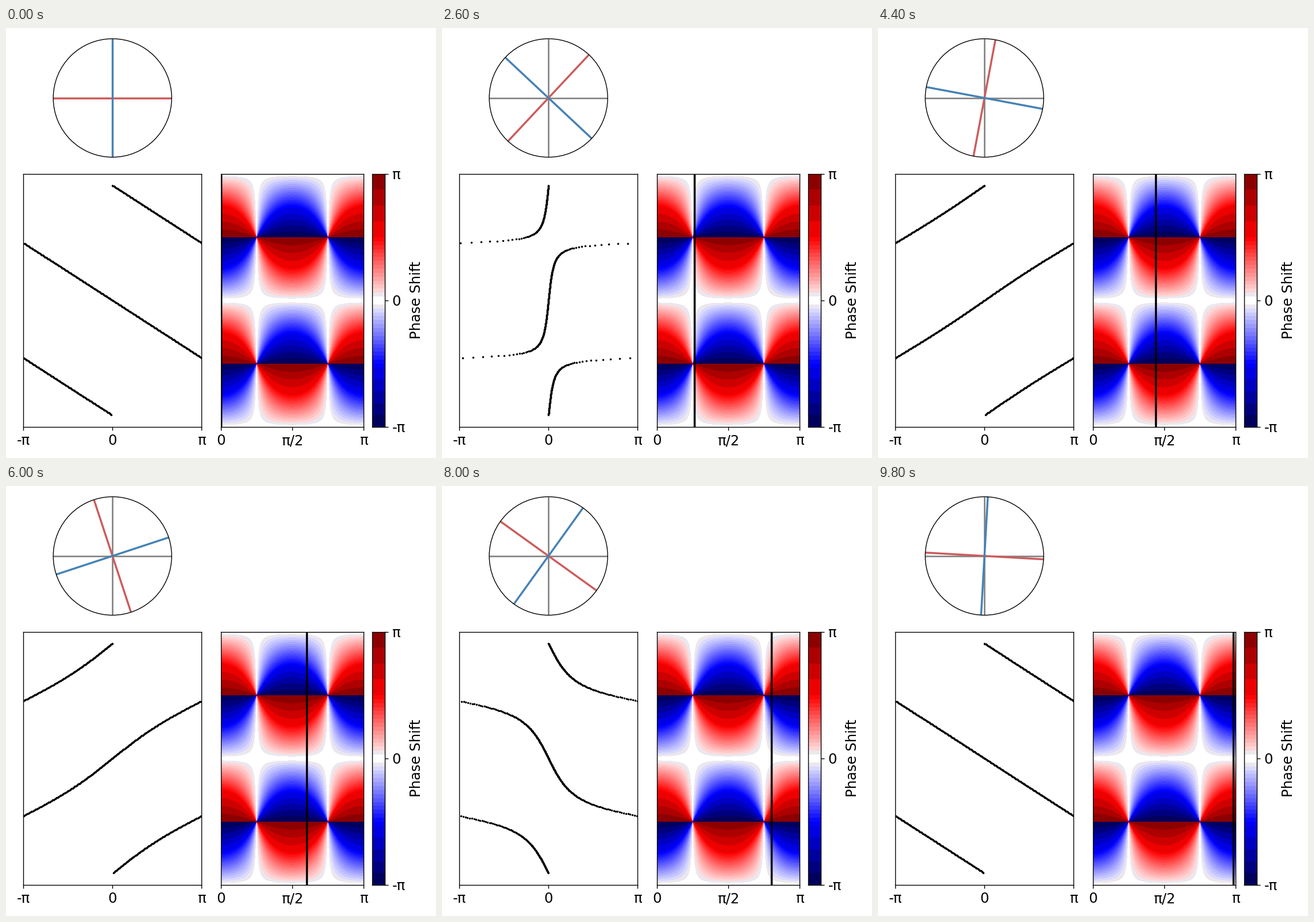
Animation of 748 by 748 pixels, one loop 10 s. Source, as a matplotlib script:

```python
import numpy as np
import matplotlib.pyplot as plt
from matplotlib.animation import FuncAnimation
from matplotlib.colors import ListedColormap

SIZE, DPI = 748, 128
FRAMES, INTERVAL = 50, 200
STEP = 10 * np.pi / 499          # plate rotation per frame
BANDS = 64
PI = np.pi


def pt(px):
    return px * 72 / DPI


plt.rcParams.update({
    "font.family": "DejaVu Sans",
    "font.size": pt(24.3),
    "axes.linewidth": pt(1.39),
    "axes.labelpad": pt(6.9),
    "xtick.major.size": pt(6.1), "ytick.major.size": pt(6.1),
    "xtick.major.pad": pt(6.1), "ytick.major.pad": pt(6.1),
    "xtick.major.width": pt(1.39), "ytick.major.width": pt(1.39),
})

fig = plt.figure(figsize=(SIZE / DPI, SIZE / DPI), dpi=DPI, facecolor="white")


def panel(left, bottom, right, top):
    return fig.add_axes([left / SIZE, bottom / SIZE,
                         (right - left) / SIZE, (top - bottom) / SIZE])


def phase(theta, delta):
    """Phase shift of a retarder turned by theta."""
    z = np.cos(delta) - 1j * np.cos(2 * theta) * np.sin(delta)
    return np.angle(z * z)


def band_colors():
    """Seismic colours, with the darkest and the palest bands merged."""
    i = np.arange(BANDS, dtype=float)
    quarter = BANDS // 4
    for k in range(0, quarter, 3):
        j = np.arange(k, min(k + 3, quarter))
        i[j] = j.mean()
    for k in range(BANDS - quarter, BANDS, 4):
        i[k:k + 4] = k + 1.5
    rgb = plt.get_cmap("seismic")((i + 0.5) / BANDS)
    mid = BANDS // 2
    rgb[mid - 1:mid + 1, :3] = 1
    rgb[[mid - 2, mid + 1], :3] = np.array([236, 231, 238]) / 255
    return ListedColormap(rgb)


def show_bands(ax, values, extent):
    ax.imshow(values, cmap=band_colors(), vmin=-PI, vmax=PI, extent=extent,
              aspect="auto", interpolation="nearest")


BOTTOM, TOP = 54.2, 494.2

# rotating axes in a circle
dial = panel(82.2, 523.3, 288.2, 729.3)
dial.set(xlim=(-1, 1), ylim=(-1, 1))
dial.axis("off")
for x, y in ((1, 0), (0, 1)):
    dial.plot([-x, x], [-y, y], color="gray", lw=pt(2.6),
              solid_capstyle="butt")
fast, = dial.plot([], [], color="indianred", lw=pt(3.47),
                  solid_capstyle="butt")
slow, = dial.plot([], [], color="steelblue", lw=pt(3.47),
                  solid_capstyle="butt")
dial.add_patch(plt.Circle((0, 0), 1, fill=False, ec="black", lw=pt(1.39),
                          zorder=5, clip_on=False))

# phase curve
curve = panel(30.2, BOTTOM, 340.2, TOP)
curve.set(xlim=(-PI, PI), ylim=(-1.1 * PI, 1.1 * PI), yticks=[])
curve.set_xticks([-PI, 0, PI], ["-π", "0", "π"])
delta = PI - np.arange(500) * PI / 250.2
dots, = curve.plot([], [], "o", color="black", ms=pt(3.5), mew=0)

# phase map with a moving cursor
chart = panel(374.2, BOTTOM, 622.1, TOP)
nx, ny = 248, 440
gx = (np.arange(nx) + 0.5) * PI / nx
gy = PI - (np.arange(ny) + 0.5) * 2 * PI / ny
show_bands(chart, phase(gx[None, :], gy[:, None]), (0, PI, -PI, PI))
chart.set(xlim=(0, PI), ylim=(-PI, PI), yticks=[])
chart.set_xticks([0, PI / 2, PI], ["0", "π/2", "π"])
cursor = chart.axvline(0, color="black", lw=pt(3.47))

# colour scale
scale = panel(637.1, BOTTOM, 659.4, TOP)
show_bands(scale, (PI - (np.arange(BANDS) + 0.5) * 2 * PI / BANDS)[:, None],
           (0, 1, -PI, PI))
scale.set(xticks=[], ylim=(-PI, PI))
scale.yaxis.tick_right()
scale.yaxis.set_label_position("right")
scale.set_yticks([-PI, 0, PI], ["-π", "0", "π"])
scale.set_ylabel("Phase Shift")


def update(frame):
    theta = frame * STEP
    c, s = np.cos(theta), np.sin(theta)
    fast.set_data([-c, c], [-s, s])
    slow.set_data([s, -s], [-c, c])
    dots.set_data(phase(theta, delta), delta)
    cursor.set_xdata([theta, theta])
    return fast, slow, dots, cursor


anim = FuncAnimation(fig, update, frames=FRAMES, interval=INTERVAL,
                     repeat=True, repeat_delay=0, blit=False)
plt.show()
```
